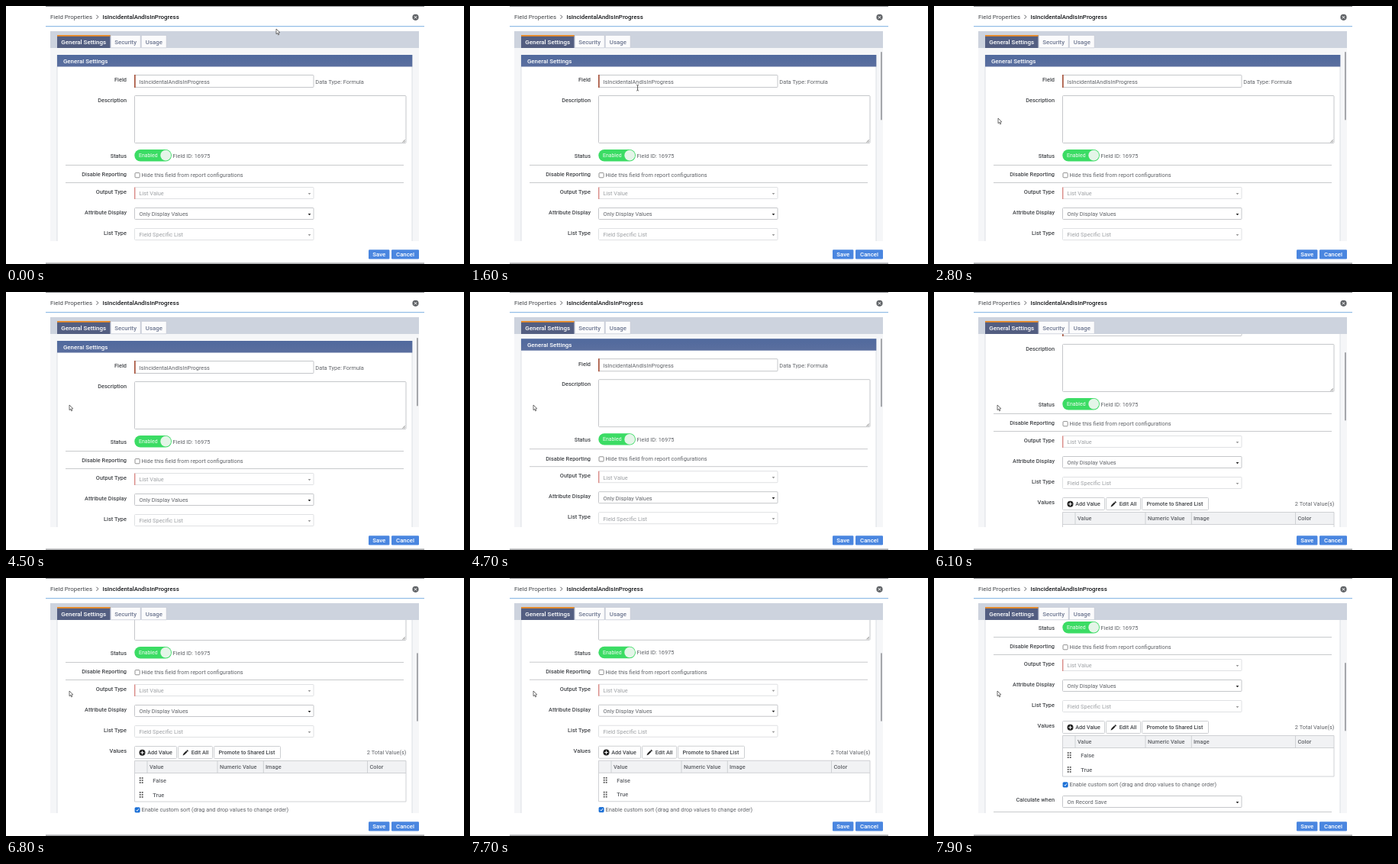
These frames come from a looping animation (600 by 338 pixels, 8 s). An HTML page with a canvas:

```html
<!DOCTYPE html>
<html lang="en">
<head>
<meta charset="utf-8">
<title>Field properties</title>
<style>
html, body { margin: 0; width: 100%; height: 100%; overflow: hidden; background: #fff; }
canvas { display: block; width: 600px; height: 338px; }
</style>
</head>
<body>
<canvas id="stage"></canvas>
<script>
const W = 600, H = 338, LOOP = 8000;
const canvas = document.getElementById('stage');
const ctx = canvas.getContext('2d');
const dpr = Math.max(1, window.devicePixelRatio || 1);
canvas.width = W * dpr;
canvas.height = H * dpr;

const INK = '#44474b', GRAY = '#606368', PALE = '#9da0a4', LINE = '#cbcdd1', EDGE = '#bfc1c5';

const clamp = x => Math.max(0, Math.min(1, x));
const smooth = x => { x = clamp(x); return x * x * (3 - 2 * x); };
const progress = (t, from, to) => smooth((t - from) / (to - from));

function box(x, y, w, h, fill) {
  ctx.fillStyle = fill;
  ctx.fillRect(x, y, w, h);
}

function rounded(x, y, w, h, r, fill, stroke, width = 0.9) {
  ctx.beginPath();
  ctx.roundRect(x, y, w, h, r);
  if (fill) { ctx.fillStyle = fill; ctx.fill(); }
  if (stroke) { ctx.strokeStyle = stroke; ctx.lineWidth = width; ctx.stroke(); }
}

function disc(x, y, r, fill) {
  ctx.beginPath();
  ctx.arc(x, y, r, 0, 7);
  ctx.fillStyle = fill;
  ctx.fill();
}

function path(points, color, width = 1) {
  ctx.beginPath();
  points.forEach(([x, y]) => ctx.lineTo(x, y));
  ctx.strokeStyle = color;
  ctx.lineWidth = width;
  ctx.stroke();
}

function polygon(points, fill) {
  ctx.beginPath();
  points.forEach(([x, y]) => ctx.lineTo(x, y));
  ctx.closePath();
  ctx.fillStyle = fill;
  ctx.fill();
}

// y is the vertical middle of the capitals
function text(str, x, y, { size = 7.4, weight = 400, color = GRAY, align = 'left' } = {}) {
  ctx.font = `${weight} ${size}px Roboto, Arial, sans-serif`;
  ctx.textAlign = align;
  ctx.fillStyle = color;
  ctx.fillText(str, x, y + size * 0.355);
}

const label = (str, y) => text(str, 158, y, { weight: 500, color: INK, align: 'right' });
const divider = y => box(78, y - 0.5, 443, 1, '#c8cacc');

function select(str, y, disabled, required) {
  rounded(168.5, y - 8, 234.5, 15, 1, '#fff', disabled ? '#dcdee0' : EDGE);
  if (required) box(168, y - 8, 1.4, 15.5, '#d98a86');
  text(str, 174.5, y + 0.2, { color: disabled ? PALE : GRAY });
  polygon([[395.6, y - 0.6], [399.4, y - 0.6], [397.5, y + 1.7]], disabled ? '#999' : '#222');
}

function checkbox(y, checked) {
  rounded(169, y - 3, 6.2, 6.2, 1, checked ? '#1a6fd6' : '#fff', checked ? '#1a6fd6' : '#777', 0.8);
  if (checked) path([[170.5, y + 0.1], [171.8, y + 1.5], [174, y - 1.5]], '#fff', 1);
}

function button(x, w, str, textX) {
  rounded(x + 0.5, 318.5, w, 16, 1, '#fff', '#c8cacd');
  text(str, textX, 326.9, { size: 7.2, weight: 500, color: INK });
}

function drawFields() {
  label('Field', 96.8);
  rounded(168.5, 90.5, 234.5, 16, 1, '#fff', EDGE);
  box(168, 90, 1.7, 17, '#a8563f');
  text('IsIncidentalAndIsInProgress', 174.5, 99);
  text('Data Type: Formula', 405.3, 99);

  label('Description', 123.6);
  rounded(168.5, 117.5, 355.5, 62, 1, '#fff', EDGE);
  path([[519.5, 178.6], [522.8, 175.3]], '#555', 0.7);
  path([[521.4, 178.6], [522.8, 177.2]], '#555', 0.7);

  label('Status', 196.5);
  rounded(168.3, 188, 48.6, 15.4, 7.7, '#3bdc64');
  disc(209.2, 195.7, 6.9, '#e4f5e8');
  text('Enabled', 174, 195.6, { size: 6.9, color: '#f2fbf4' });
  text('Field ID: 16975', 218.6, 196);

  divider(208.5);
  label('Disable Reporting', 220.7);
  checkbox(221.6, false);
  text('Hide this field from report configurations', 177.5, 221.3);
  divider(231.5);

  label('Output Type', 243.5);
  select('List Value', 245.5, true, true);
  label('Attribute Display', 270.6);
  select('Only Display Values', 272.5, false);
  label('List Type', 297.5);
  select('Field Specific List', 299.5, true);
}

function drawValues() {
  label('Values', 324.4);
  button(168, 55, 'Add Value', 185.2);
  disc(178.5, 326.8, 4, '#222');
  path([[176.2, 326.8], [180.8, 326.8]], '#fff', 1);
  path([[178.5, 324.5], [178.5, 329.1]], '#fff', 1);
  button(225, 45, 'Edit All', 242.8);
  path([[233, 329], [237, 325]], '#222', 2.1);
  path([[237.3, 324.7], [238.3, 323.7]], '#222', 2.1);
  polygon([[231.6, 330.4], [232.2, 328.2], [233.8, 329.8]], '#222');
  button(272, 87, 'Promote to Shared List', 278.4);
  text('2 Total Value(s)', 524.3, 326.8, { align: 'right' });

  box(168.5, 337.5, 355.5, 16, '#f1f2f4');
  rounded(168.5, 337.5, 355.5, 53.5, 0, null, LINE);
  path([[168.5, 353.5], [524, 353.5]], LINE, 0.9);
  [185, 277, 337.3, 473.5].forEach(x => path([[x, 337.5], [x, 353.5]], LINE, 0.9));
  [['Value', 188], ['Numeric Value', 280], ['Image', 340], ['Color', 476.5]]
    .forEach(([str, x]) => text(str, x, 345.8, { weight: 500 }));
  [['False', 363.2], ['True', 382]].forEach(([str, y]) => {
    for (let i = 0; i < 6; i++) {
      box(174.8 + (i % 2) * 3, y - 4 + Math.floor(i / 2) * 3, 1.8, 1.8, '#555');
    }
    text(str, 192.3, y, { weight: 500 });
  });

  checkbox(401.8, true);
  text('Enable custom sort (drag and drop values to change order)', 177.5, 401.4);
  label('Calculate when', 421.8);
  select('On Record Save', 424.5, false);
  divider(437.5);
}

function drawContent(scroll, hovering) {
  ctx.save();
  ctx.beginPath();
  ctx.rect(58, 55, 483, 253);
  ctx.clip();
  box(58, 55, 483, 253, '#f5f6f8');
  ctx.save();
  ctx.translate(0, -scroll);
  box(66.5, 64, 466, 460, '#dcdfe4');
  box(67.5, 64, 464, 460, '#fff');
  const shade = ctx.createLinearGradient(0, 64, 0, 79.5);
  shade.addColorStop(0, '#50699d');
  shade.addColorStop(1, '#5b6f9f');
  box(67, 64, 465.3, 15.5, shade);
  text('General Settings', 75, 72, { size: 7.9, weight: 500, color: '#fff' });
  drawFields();
  drawValues();
  ctx.restore();
  if (hovering) rounded(538.1, 60 + scroll * 0.39, 1.7, 89.5, 0.8, '#97999d');
  ctx.restore();
}

function drawFrame() {
  box(0, 0, W, H, '#fff');
  box(52, 0, 496, 1, '#8a8c8f');
  box(52, 336.5, 496, 1.2, '#8a8c8f');
  box(52, 26.2, 496, 1, '#7aaee2');
  text('Field Properties', 58, 14.2, { size: 7.9, color: INK });
  path([[118.4, 11.8], [120.9, 14.3], [118.4, 16.8]], INK, 0.9);
  text('IsIncidentalAndIsInProgress', 126.5, 14.2, { size: 7.95, weight: 500, color: '#16181b' });
  disc(536.5, 14.8, 4.1, '#5f6266');
  path([[534.8, 13.1], [538.2, 16.5]], '#fff', 1);
  path([[538.2, 13.1], [534.8, 16.5]], '#fff', 1);

  rounded(475, 319.2, 27.4, 12.2, 1.2, '#4a86e0');
  rounded(505, 319.2, 36, 12.2, 1.2, '#4a86e0');
  const white = { size: 7.8, weight: 500, color: '#fff', align: 'center' };
  text('Save', 488.7, 325.3, white);
  text('Cancel', 523, 325.3, white);
}

function drawTabs() {
  box(58, 33, 483, 22, '#cdd3de');
  box(67, 38, 69.5, 17, '#535e81');
  box(67, 38, 69.5, 1.8, '#ee8d26');
  [[137, 39.5, 'Security', 142.2], [177, 33.5, 'Usage', 182.8]].forEach(([x, w, str, textX]) => {
    rounded(x + 0.3, 38.4, w - 0.6, 16.4, 0.5, '#fbfbfc', '#bfc5d1', 0.6);
    text(str, textX, 46.9, { size: 7.9, weight: 500, color: '#6c7690' });
  });
  text('General Settings', 72.3, 46.9, { size: 7.95, weight: 500, color: '#fff' });
}

function pointerAt(t) {
  const k = progress(t, 1100, 2100), m = 1 - k;
  const curve = (a, b, c) => m * m * a + 2 * m * k * b + k * k * c;
  const drift = progress(t, 3300, 3700);
  return [curve(354, 221, 84) - drift, curve(30, 125.5, 147) + drift];
}

function drawPointer([x, y]) {
  const overInput = x > 168 && x < 403 && y > 90 && y < 107.6;
  const overArea = x > 168 && x < 524 && y > 118 && y < 180;
  if (overInput || overArea) {
    path([[x, y - 3.3], [x, y + 3.3]], '#444', 0.9);
    [-1, 1].forEach(s => path([[x - 1.5, y + s * 4], [x, y + s * 3.2], [x + 1.5, y + s * 4]], '#444', 0.8));
    return;
  }
  const arrow = [[0, 0], [0, 6.7], [1.5, 5.4], [2.6, 7.9], [3.7, 7.4], [2.7, 5], [4.7, 4.8]]
    .map(([dx, dy]) => [x + dx, y + dy]);
  polygon(arrow, '#fff');
  path([...arrow, arrow[0]], '#4a4a4a', 0.8);
}

function render(t) {
  ctx.setTransform(dpr, 0, 0, dpr, 0, 0);
  const pointer = pointerAt(t);
  const scroll = 49 * (progress(t, 4650, 5000) + progress(t, 6200, 6600)) + 33 * progress(t, 7690, 7900);
  drawFrame();
  drawContent(scroll, pointer[1] > 55);
  drawTabs();
  drawPointer(pointer);
}

function tick() {
  render(performance.now() % LOOP);
  requestAnimationFrame(tick);
}
tick();
</script>
</body>
</html>
```
